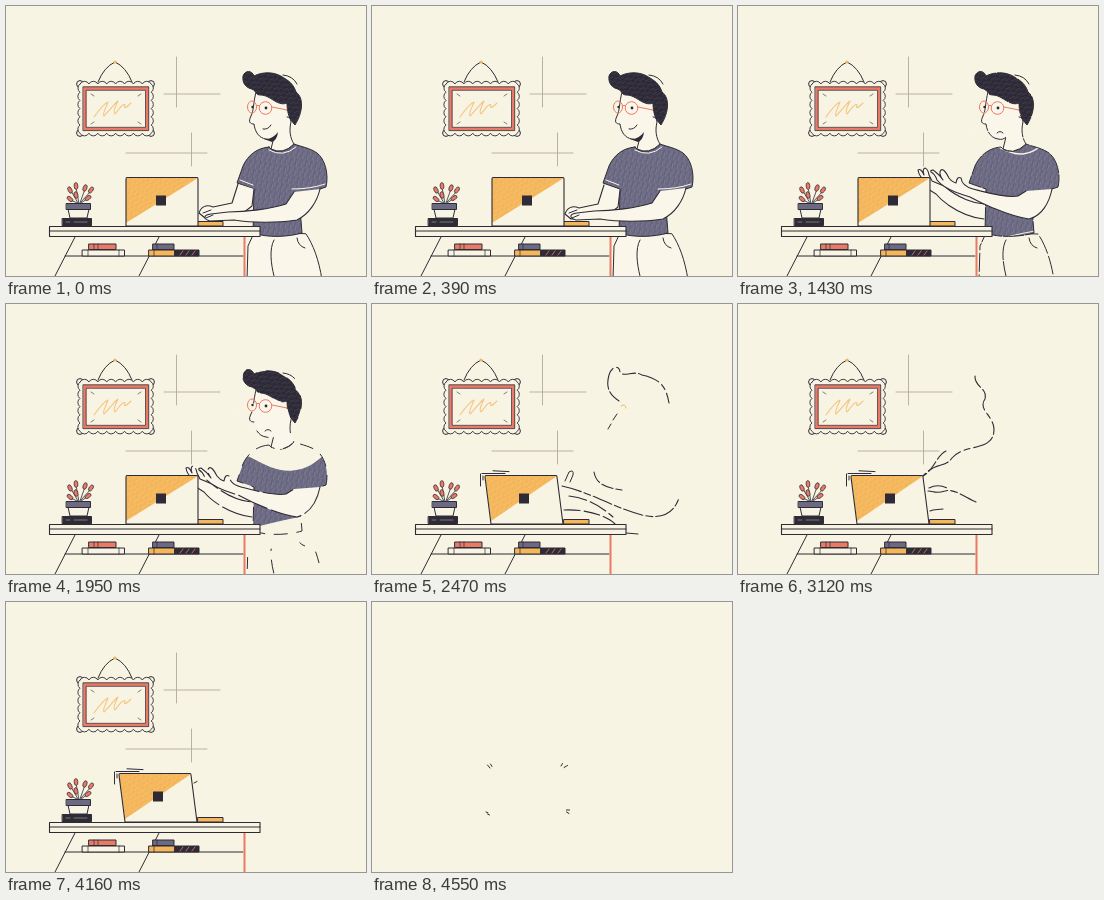
Recreate the animation shown at these times as an HTML page. Size 360 px wide and 270 px high, loop 4.68 s.

```html
<!DOCTYPE html>
<html lang="en">
<head>
<meta charset="utf-8">
<title>Vanishing into the laptop</title>
<style>
html, body { margin: 0; width: 100%; height: 100%; overflow: hidden; background: #f8f4e3; }
svg { display: block; width: 360px; height: 270px; }
path { stroke-linecap: round; stroke-linejoin: round; }
</style>
</head>
<body>
<svg viewBox="0 0 360 270">
  <defs id="defs"></defs>
  <g id="stage"></g>
</svg>
<script>
const STEP = 130, STEPS = 36;
const BG = '#f8f4e3', INK = '#2e2b36', PAPER = '#faf7ea', PURPLE = '#6c6983';
const RED = '#e97b66', YELLOW = '#f4b65a', PALE = '#f4c583', GREY = '#aeaba2';
const CLOTH = 'url(#cloth)', HATCHED_HAIR = 'url(#hair)', CRAYON = 'url(#crayon)';
const stage = document.getElementById('stage');

// Pencil hatching: a base colour with lighter and darker strokes.
const hatch = (id, base, light, dark, angle) =>
  `<pattern id="${id}" width="5" height="9" patternUnits="userSpaceOnUse" patternTransform="rotate(${angle})">
    <rect width="5" height="9" fill="${base}"/>
    <path d="M1 0V5M3.6 4V9" stroke="${light}" stroke-width=".7"/>
    <path d="M2.3 1V7" stroke="${dark}" stroke-width=".7"/></pattern>`;
document.getElementById('defs').innerHTML =
  hatch('cloth', '#6c6983', '#85829a', '#575470', 10) +
  hatch('hair', '#2e2a38', '#4a4655', '#24212c', 65) +
  hatch('crayon', YELLOW, '#f8c678', '#f1ae50', 35);

const shape = (d, fill = 'none', stroke = INK, width = 1, extra = '') =>
  `<path d="${d}" fill="${fill}" stroke="${stroke}" stroke-width="${width}" ${extra}/>`;
const line = (d, color = INK, width = 1, extra = '') => shape(d, 'none', color, width, extra);
const box = (x, y, w, h, fill, stroke, width) => shape(`M${x} ${y}h${w}v${h}h${-w}z`, fill, stroke, width);
const dot = (x, y, r, fill, stroke = 'none') =>
  `<circle cx="${x}" cy="${y}" r="${r}" fill="${fill}" stroke="${stroke}"/>`;
const clamp = v => Math.max(0, Math.min(1, v));

// Blends two paths that share the same commands.
function mix(a, b, t) {
  const target = b.match(/-?[\d.]+/g);
  let i = 0;
  return a.replace(/-?[\d.]+/g, n => (+n + (target[i++] - n) * t).toFixed(1));
}

function wall() {
  const arcs = (n, dx, dy) => `a5 5 0 0 1 ${dx} ${dy}`.repeat(n);
  const scallops = 'M74 78' + arcs(8, 8.9, 0) + arcs(6, 0, 8.2) + arcs(8, -8.9, 0) + arcs(6, 0, -8.2) + 'z';
  const corners = [[74, 78], [145, 78], [74, 127], [145, 127]];
  return line('M170.5 51V101M158 88H214M185.5 127V160M120 147H201', GREY, .9) +
    line('M92 76Q98 61 109 56Q120 61 126 76') + dot(109, 56, 1.6, YELLOW) +
    corners.map(([x, y]) => dot(x, y, 3.4, BG, INK)).join('') +
    shape(scallops, BG, INK, .9) +
    box(77.3, 80.8, 65.4, 43.8, RED, INK, .8) + box(80.5, 84.3, 59, 37, BG, INK, .7) +
    line('M85 88l3 2M135 88l-3 2M85 118l3-2M135 118l-3-2', INK, .6) +
    line('M88 111C93 104 99 97 102 96C100 102 96 108 98 110C104 104 109 97 112 95C110 100 106 106 109 108C113 103 117 97 119 99Q117 105 125 97', PALE, 1.1);
}

function plant() {
  const leaves = [[64, 184, -25], [70, 180, -5], [79, 182, 20], [85, 184, 35],
    [64, 193, -50], [70, 189, -15], [82, 192, 55]];
  return line('M73 198L70 181M74 197L79 183M75 196L85 185M72 197L65 185M73 198L65 194M75 197L81 193', INK, .8) +
    leaves.map(([x, y, a]) => `<ellipse cx="${x}" cy="${y}" rx="1.9" ry="3.4" transform="rotate(${a} ${x} ${y})" fill="${RED}" stroke="${INK}" stroke-width=".7"/>`).join('') +
    shape('M62 203L64 212H81L83 203z', BG) + box(60.5, 197.5, 24, 6, PURPLE) +
    box(56.5, 212.5, 29, 7, INK) + line('M60 216h4M68 216h13', GREY, .6);
}

function desk() {
  return line('M69 231L49 270M153 231L133 270M59 250H237') + line('M238.5 231V270', RED, 2) +
    box(83, 238, 27, 5.5, RED) + box(76.5, 244, 42, 6, BG) + line('M88 238v5M92 238v5M82 244v6M113 244v6', INK, .7) +
    box(147, 238, 21, 5.5, PURPLE) + box(143, 244, 26, 6, YELLOW) + box(169, 244, 24, 6, INK) +
    line('M174 249l3-4M180 249l3-4M186 249l3-4', RED, .8) + line('M151 238v5M148 244v6', INK, .7) +
    box(43.5, 220.5, 210.5, 10, BG, INK, 1.1) + line('M43.5 225H254');
}

function laptop(tilted) {
  const [left, right, foot, end] = tilted ? [113, 185, 119, 191] : [120, 192, 120, 192];
  const outline = `M${left + 1} 171.5H${right - 1}Q${right} 171.5 ${right} 173L${end} 220H${foot}L${left} 173Q${left} 171.5 ${left + 1} 171.5z`;
  const marks = 'M108.5 170V182M111 172V176M110 169.5L133 169.5M121 166.8L137 167.6';
  return box(192, 215.5, 25, 4.5, YELLOW) + shape(outline, BG, 'none') +
    shape(`M${left} 172H${right}L${foot} 217z`, CRAYON, 'none') +
    shape(outline, 'none', INK, 1.1) +
    `<rect x="${tilted ? 147 : 150}" y="189.5" width="10" height="10" fill="${INK}"/>` +
    (tilted ? line(marks) : '');
}

const SHIRT = 'M263 141C251 142 242 149 237 160L231 177L248 183L247 227C262 232 282 231 296 227L293 190L320 181C323 168 319 153 311 147C304 142 296 141 288 138C282 146 268 148 263 141z';
const HAIR = 'M246 83C240 82 236 77 237 70C239 64 246 64 248 70C258 65 270 66 278 72C285 76 288 80 290 86C298 92 297 106 289 119L284 113C282 108 281 103 281 97C274 100 268 94 262 91C256 88 254 90 251 88C250 86 248 84 246 83z';
const FACE = 'M250 86C247 98 248 104 245 110C242 116 244 118 248 118C249 126 253 132 260 133C264 134 266 133 268 131L265 143Q277 149 288 138C284 132 283 124 285 116L281 94z';
const ARMS = {
  typing: [
    'M232 178L226 197L207 201C200 198 195 201 193 207L199 212L232 211L246 200L248 183',
    'M314 183C311 196 303 208 291 214C272 217 246 217 228 214L204 215C197 213 197 209 205 208L222 206C240 206 264 203 280 198L288 186'],
  raised: [
    'M246 213C228 211 208 200 198 188C190 184 187 180 185 173Q181 170 180 164Q183 162 186 169Q184 163 187 162Q190 163 191 169L194 175L206 180C218 190 232 197 246 198',
    'M314 183C311 198 303 210 291 213C276 211 250 201 232 191C222 188 206 183 199 174Q197 168 193 166Q192 164 195 164Q201 168 205 174Q200 167 203 164Q206 162 211 172Q214 176 218 177Q219 170 223 172Q224 180 235 183C250 187 270 192 280 190L288 185']
};

function person(step) {
  const typing = step < 6, fade = clamp((step - 10) / 9);
  const dashes = (on, off) => fade ? `stroke-dasharray="${on - 16 * fade} ${off * fade}"` : '';
  const dash = dashes(22, 17), armDash = dashes(40, 8);
  const skin = fade > .7 ? 'none' : PAPER;
  const pen = d => line(d, INK, 1, dash);
  const erase = (d, width) => width > 0 ? line(d, BG, width) : '';
  const arm = (d, dy) => `<g transform="translate(0 ${dy})">${shape(d, skin, INK, 1.1, armDash)}</g>`;
  const [far, near] = ARMS[typing ? 'typing' : 'raised'];
  const bob = typing ? step % 2 : 0;
  const mouth = typing ? line('M257 123Q262 124 265 119')
    : fade ? line('M259 127Q262 124 265 127') : shape('M259 121C262 118 265 122 263 126C260 128 257 124 259 121z', PAPER);
  const details = fade ? '' :
    shape('M258 133Q266 134 272 126Q271 134 266 136z', INK, 'none') +
    line('M263 144Q277 152 290 141M234 174L247 179M286 183Q305 183 319 178', PAPER, 1);

  return shape('M248 227L242 240L241 274H316C313 254 307 238 300 228z', fade ? 'none' : PAPER, INK, 1, dashes(20, 30)) +
    pen('M268 234C263 243 265 258 268 270M291 232Q292 240 299 242') +
    shape(SHIRT, CLOTH, 'none') +
    erase('M225 130C245 125 265 150 285 148S305 128 330 130', 120 * fade * fade) +
    erase('M236 238C262 234 275 228 304 224', 80 * fade * fade) + pen(SHIRT) +
    shape(FACE, fade > .7 ? BG : PAPER, INK, 1, dash) +
    shape(HAIR, HATCHED_HAIR, 'none') +
    erase('M228 124Q258 94 304 120', 120 * clamp(fade - .6)) + pen(HAIR) +
    pen('M277 69Q287 70 291 78M281 104Q288 101 287 107Q285 113 281 111') +
    dot(246.5, 101, 1.2, INK) + dot(260, 102, 1.4, INK) +
    `<ellipse cx="246" cy="101" rx="4.5" ry="6" fill="none" stroke="${RED}"/>` + dot(259.5, 102, 6.3, 'none', RED) +
    line('M250.5 100Q252 98 253.5 100M266 101L281 104', RED) + mouth + details +
    arm(far, bob) + (typing || fade ? '' : line('M209 183l3 9M214 184l3 9', RED)) + arm(near, -bob) +
    (typing ? line('M197 207l8-3M200 212l7-3') : '');
}

// Outline traces: [leaving the body, swirling, inside the laptop, dash]
const TRACES = [
  ['M247 97C236 90 234 82 237 71C240 61 248 61 248 69C254 73 262 66 270 71C288 75 294 82 297 99',
    'M237 72C236 83 250 84 247 95C238 107 261 113 255 132C249 147 226 140 214 154C206 165 198 157 185 172',
    'M190 178C190 178 190 178 190 178C189 179 189 179 189 179C189 179 188 180 188 180C188 180 187 180 187 180', '13 3 22 4 6 4'],
  ['M222 168C224 180 234 184 250 186', 'M208 147C198 152 196 166 185 172', 'M190 180C190 180 189 180 188 181', '12 3'],
  ['M190 182C218 188 240 203 270 211C290 216 302 209 307 194', 'M190 187C196 187 197 190 207 187C216 184 228 194 238 198',
    'M189 180C190 180 190 180 190 180C190 180 190 179 190 179', '20 3 7 3'],
  ['M197 192C215 194 230 203 241 213', 'M191 184C199 180 205 182 209 184', 'M190 185C190 185 190 185 190 185', '18 4'],
  ['M192 206C215 205 235 212 243 220', 'M192 207C196 205 200 206 205 205', 'M191 200C191 200 191 200 191 200', '16 4']
];

function traces(step) {
  const swirl = clamp((step - 19) / 5), pull = clamp((step - 24) / 7);
  const lines = TRACES.map(([body, curl, sink, dash]) =>
    line(mix(mix(body, curl, swirl), sink, pull), INK, 1.1, `stroke-dasharray="${dash}"`)).join('');
  const early = line('M193 177L197 168Q202 165 201 171L198 178M236 125l3-5M241 116l4-6M254 229l12 1') +
    line('M249 102Q253 99 254 104', YELLOW);
  return lines + (step < 21 ? early : '');
}

const BURST = 'M115.5 163l2.5 3M118.5 162l1.5 2.5M189 164l1.5-2.5M192 165.5l3.5-2M114 210l2 .8M115.5 212l2 1M194.5 208h3M194.5 210l2.5 1.5';

function draw(step) {
  if (step === 35) return line(BURST, INK, 1);
  if (step === 34) return laptop(true);
  if (step === 33) return desk() + laptop(true);
  return wall() + (step < 19 ? person(step) : step < 32 ? traces(step) : line('M188 181l3-1.5')) +
    plant() + desk() + laptop(step > 16);
}

let shown = -1;
function tick(now) {
  const step = Math.floor(now / STEP) % STEPS;
  if (step !== shown) stage.innerHTML = draw(shown = step);
  requestAnimationFrame(tick);
}
tick(performance.now());
</script>
</body>
</html>
```
